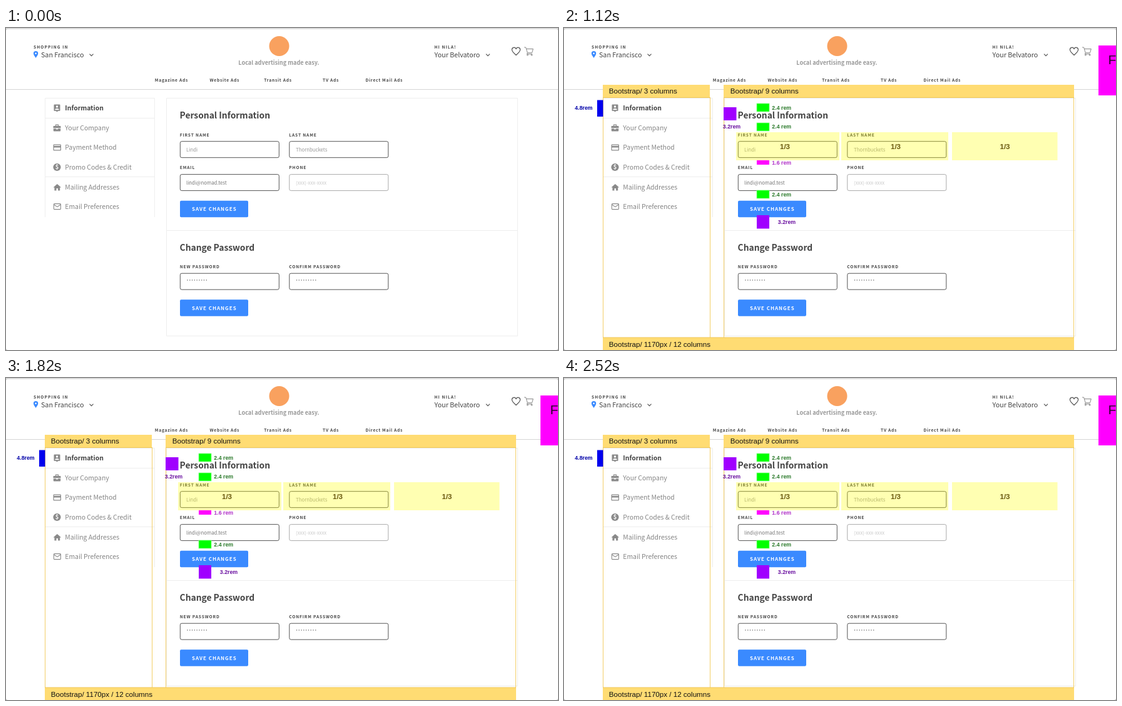
Animation, 882 px wide and 516 px high, one loop 2590 ms. Source, as an HTML page:

```html
<!DOCTYPE html>
<html lang="en">
<head>
<meta charset="utf-8">
<title>Account page with layout guides</title>
<style>
  html, body { margin: 0; width: 100%; height: 100%; overflow: hidden; background: #bbb; }
  svg { display: block; width: 882px; height: 516px; }
  text { font-family: "Noto Sans CJK SC", "Noto Sans CJK JP", "Noto Sans", sans-serif; fill: #444; white-space: pre; }
  .place { font-size: 10.7px; }
  .caps { font-size: 6.6px; font-weight: 700; letter-spacing: .88px; }
  .top { letter-spacing: 1.1px; }
  .nav { font-size: 6.6px; font-weight: 600; letter-spacing: .78px; }
  .tag { font-size: 9.15px; font-weight: 600; fill: #999; }
  .side { font-size: 10.4px; fill: #858585; }
  .on { font-weight: 600; fill: #444; }
  .title { font-size: 13.8px; font-weight: 600; }
  .value { font-size: 7.8px; fill: #999; }
  .hint { fill: #ccc; }
  .save { font-size: 8px; font-weight: 700; letter-spacing: 1px; fill: #fff; }
  .rule { fill: none; stroke: #eee; }
  .field { fill: #fff; stroke: #555; }
  .line { fill: none; stroke: #555; stroke-width: 1.2; }
  .icon { fill: #8a8a8a; }
  .cut { fill: #fff; }
  .dots { stroke: #666; stroke-width: 1.6; stroke-linecap: round; stroke-dasharray: 0 3.78; }
  #guides text { font-family: "Liberation Sans", Arial, sans-serif; }
  #guides .bar { font-size: 11.6px; fill: #111; }
  #guides .rem { font-size: 8.8px; font-weight: 700; }
  #guides .third { font-size: 11.5px; font-weight: 700; fill: #6b5a10; }
</style>
</head>
<body>
<svg viewBox="0 0 882 516">
  <defs>
    <rect id="box" width="158" height="26" rx="2.5"/>
    <path id="chevron" d="M0 0l3 3 3-3"/>
    <g id="button">
      <rect width="109" height="26.5" rx="2" fill="#3a8aff"/>
      <text class="save" x="19" y="16.5">SAVE CHANGES</text>
    </g>
    <path id="secret" class="dots" d="M0 0h31"/>
    <rect id="green" width="20" height="13" fill="#0f0" stroke="#8f8" stroke-width=".8"/>
  </defs>

  <rect y="1.5" width="882" height="514.5" rx="3" fill="#fff"/>
  <rect width="882" height="1.5" fill="#ddd"/>
  <path d="M0 98.5h882" stroke="#d6d6d6"/>

  <!-- header -->
  <text class="caps top" x="44" y="32.8">SHOPPING IN</text>
  <path fill="#3a8aff" d="M47.6 48C46 45.5 43.9 43 43.9 40.8a3.7 3.7 0 0 1 7.4 0C51.3 43 49.2 45.5 47.6 48z"/>
  <circle class="cut" cx="47.6" cy="40.7" r="1.3"/>
  <text class="place" x="56" y="46.8">San Francisco</text>
  <use href="#chevron" class="line" x="133.5" y="41.7"/>
  <circle cx="436.5" cy="29" r="16" fill="#f9a15f"/>
  <text class="tag" x="371.3" y="59">Local advertising made easy.</text>
  <text class="caps top" x="684.5" y="33.3">HI NILA!</text>
  <text class="place" x="684.5" y="47.3">Your Belvatoro</text>
  <use href="#chevron" class="line" x="767" y="41.7"/>
  <path class="line" d="M815 43.5C811 40 808.4 37.7 808.4 34.8 808.4 31 813 29.8 815 33.4 817 29.8 821.6 31 821.6 34.8 821.6 37.7 819 40 815 43.5z"/>
  <g class="line" style="stroke:#888;stroke-width:1">
    <path d="M828 31h2.6l2.6 8.7h7.3l1.8-6.2h-10.8M833.2 39.7l-.8 2h8.3"/>
    <circle cx="833.4" cy="43.2" r="1"/><circle cx="840" cy="43.2" r="1"/>
  </g>
  <g class="nav">
    <text x="237.8" y="86.4">Magazine Ads</text>
    <text x="325.5" y="86.4">Website Ads</text>
    <text x="412.3" y="86.4">Transit Ads</text>
    <text x="506" y="86.4">TV Ads</text>
    <text x="574.6" y="86.4">Direct Mail Ads</text>
  </g>

  <!-- side menu -->
  <path class="rule" d="M62.5 303V112.5h175V303M62.5 144.5h175M62.5 238.5h175"/>
  <text class="side on" x="94.3" y="132.3">Information</text>
  <text class="side" x="94.3" y="164">Your Company</text>
  <text class="side" x="94.3" y="195.2">Payment Method</text>
  <text class="side" x="94.3" y="227">Promo Codes &amp; Credit</text>
  <text class="side" x="94.3" y="258.8">Mailing Addresses</text>
  <text class="side" x="94.3" y="290">Email Preferences</text>
  <g class="icon">
    <path d="M77.5 122.5h8a1 1 0 0 1 1 1v8.5a1 1 0 0 1-1 1h-2.4l-1.6 1.6-1.6-1.6h-2.4a1 1 0 0 1-1-1v-8.5a1 1 0 0 1 1-1z"/>
    <path d="M76.5 157h10a1 1 0 0 1 1 1v2.3H75.5V158a1 1 0 0 1 1-1zM75.8 161.3h4.4v1.3h2.6v-1.3h4.4v3.2a1 1 0 0 1-1 1h-9.4a1 1 0 0 1-1-1z"/>
    <path d="M79.5 157v-1.8h4v1.8" fill="none" stroke="#8a8a8a" stroke-width="1.2"/>
    <rect x="75.5" y="186.5" width="12.5" height="10" rx="1.2"/>
    <circle cx="81.5" cy="223" r="6.1"/>
    <path d="M81.8 250l6.3 5.6h-1.9v5h-3.1v-3.5h-2.6v3.5h-3.1v-5h-1.9z"/>
    <rect x="76.4" y="281.6" width="11" height="9" rx="1" fill="none" stroke="#8a8a8a" stroke-width="1.1"/>
    <path d="M76.6 283l5.3 3.6 5.3-3.6" fill="none" stroke="#8a8a8a" stroke-width="1.1"/>
  </g>
  <g class="cut">
    <circle cx="81.5" cy="126" r="1.7"/>
    <path d="M78.2 131.2c0-3 6.6-3 6.6 0z"/>
    <path d="M76.7 187.7h10.1v1.3H76.7zM76.7 191.4h10.1v3.9H76.7z"/>
    <text x="78.8" y="226.4" style="font-size:9.4px;font-weight:700;fill:#fff">$</text>
  </g>

  <!-- forms -->
  <path class="rule" d="M256.5 112.5h561v381h-561zM256.5 324.5h561"/>
  <text class="title" x="277.6" y="145">Personal Information</text>
  <text class="title" x="277.6" y="356.5">Change Password</text>
  <g class="caps">
    <text x="277.8" y="173.5">FIRST NAME</text>
    <text x="452.3" y="173.5">LAST NAME</text>
    <text x="277.8" y="226.4">EMAIL</text>
    <text x="452.3" y="226.4">PHONE</text>
    <text x="277.8" y="385">NEW PASSWORD</text>
    <text x="452.3" y="385">CONFIRM PASSWORD</text>
  </g>
  <g class="field">
    <use href="#box" x="278.3" y="181.7"/>
    <use href="#box" x="452.8" y="181.7"/>
    <use href="#box" x="278.3" y="234.6"/>
    <use href="#box" x="452.8" y="234.6" stroke="#aaa"/>
    <use href="#box" x="278.3" y="393.2"/>
    <use href="#box" x="452.8" y="393.2"/>
  </g>
  <text class="value" x="288" y="198">Lindi</text>
  <text class="value" x="463" y="198">Thornbuckets</text>
  <text class="value" x="288" y="250.7" style="fill:#777">lindi@nomad.test</text>
  <text class="value hint" x="463" y="250.7">(xxx)-xxx-xxxx</text>
  <use href="#secret" x="290" y="404"/>
  <use href="#secret" x="464.5" y="404"/>
  <use href="#button" x="278" y="276.7"/>
  <use href="#button" x="278" y="435.3"/>

  <g id="guides" visibility="hidden">
    <path d="M62.5 111v385M233.5 111v385M255.5 111v385M814.5 111v385" stroke="#f3cf68"/>
    <path d="M62 91h171v20.5H62zM255 91h560v20.5H255zM62 496h753v20H62z" fill="#ffdc73"/>
    <path d="M62 111.5h172M255 111.5h560M62 496h753" stroke="#f0c858"/>
    <g class="bar">
      <text class="bar" x="71.8" y="105.3">Bootstrap/ 3 columns</text>
      <text class="bar" x="265.8" y="105.3">Bootstrap/ 9 columns</text>
      <text class="bar" x="71.8" y="510.5">Bootstrap/ 1170px / 12 columns</text>
    </g>
    <path d="M275 167h165v45H275zM443 167h171v45H443zM620 167h168.500v45H620z" fill="#ff0" fill-opacity=".3"/>
    <text class="third" x="345" y="193.5">1/3</text>
    <text class="third" x="522" y="193.5">1/3</text>
    <text class="third" x="696.500" y="193.5">1/3</text>

    <path d="M53 115.500h9.500v26.500H53z" fill="#00e"/>
    <path d="M255 127h20.500v21H255zM308 300h20v21.500h-20z" fill="#a000ff"/>
    <path d="M308 212h20v7h-20zM854 28h28v80h-28z" fill="#f0f"/>
    <use href="#green" x="308" y="121"/>
    <use href="#green" x="308" y="152"/>
    <use href="#green" x="308" y="260"/>
    <text x="869.500" y="58" style="font-size:21px;fill:#303">F</text>
    <g class="rem">
      <text x="17.300" y="130.500" style="fill:#0000a8">4.8rem</text>
      <g>
        <text x="332.300" y="130.500" style="fill:#2b7a2b">2.4 rem</text>
        <text x="332.300" y="161" style="fill:#2b7a2b">2.4 rem</text>
        <text x="332.300" y="269.500" style="fill:#2b7a2b">2.4 rem</text>
      </g>
      <text x="332.300" y="218.700" style="fill:#b030c8">1.6 rem</text>
      <text x="253.800" y="161" style="fill:#6a10a0">3.2rem</text>
      <text x="341.800" y="313.700" style="fill:#6a10a0">3.2rem</text>
    </g>
  </g>
</svg>
<script>
  const LOOP = 2590, GUIDES_ON = 840;
  const guides = document.getElementById("guides");
  const start = performance.now();

  function draw(now) {
    const t = Math.max(0, now - start) % LOOP;
    guides.setAttribute("visibility", t >= GUIDES_ON ? "visible" : "hidden");
    requestAnimationFrame(draw);
  }
  requestAnimationFrame(draw);
</script>
</body>
</html>
```
